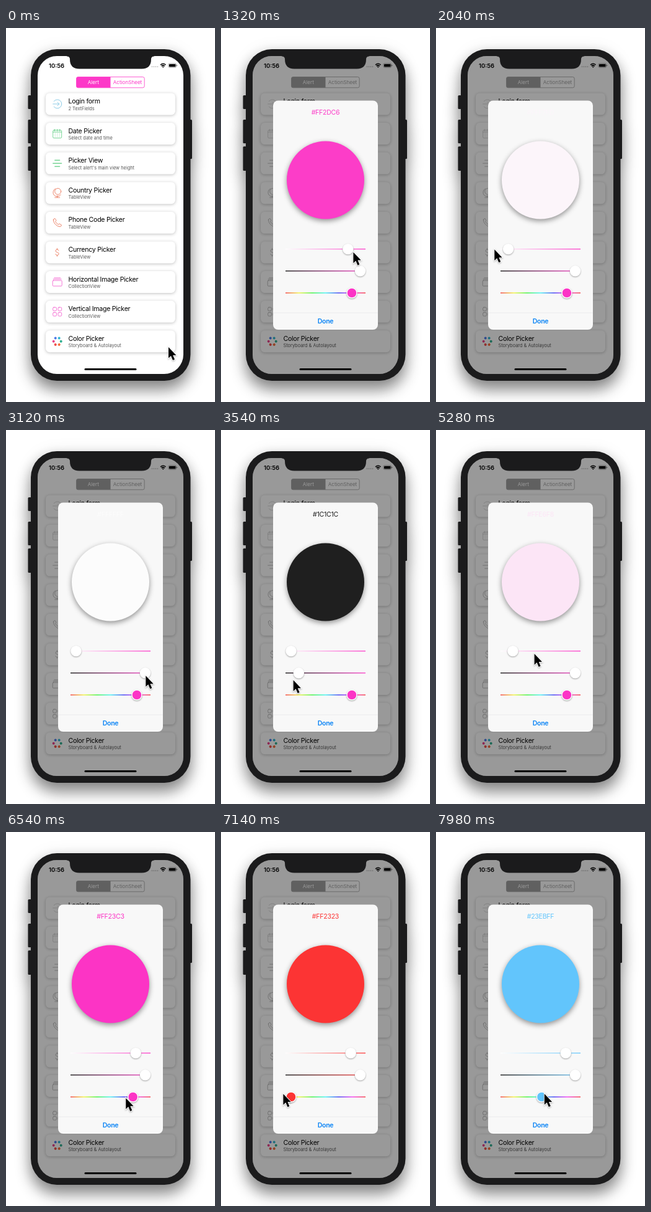
Recreate the animation shown at these times as an HTML page. Size 337 by 600 pixels, loop 8 s.

```html
<!DOCTYPE html>
<html lang="en">
<head>
<meta charset="utf-8">
<title>Color picker alert</title>
<style>
  html, body { margin: 0; width: 100%; height: 100%; overflow: hidden; background: #fff; }
  svg { display: block; width: 100vw; height: 100vh; }
  text { font-family: Inter, "Noto Sans", sans-serif; }
  .mid { text-anchor: middle; }
  .title { font-size: 10.6px; letter-spacing: -.28px; }
  .sub { font-size: 7.4px; fill: #5a5a5a; }
  .seg { font-size: 8.1px; }
  .icon { fill: none; stroke-width: .8; stroke-linecap: round; stroke-linejoin: round; }
  .card { fill: #fff; filter: drop-shadow(0 1.5px 2.5px rgba(0,0,0,.25)); }
  .knob { fill: #fff; filter: drop-shadow(0 1px 1.3px rgba(0,0,0,.35)); }
  #body { filter: drop-shadow(0 14px 12px rgba(0,0,0,.46)) drop-shadow(0 0 11px rgba(0,0,0,.08)); }
  #disc { filter: drop-shadow(0 3px 4.5px rgba(0,0,0,.42)); }
  #cursor { filter: drop-shadow(0 1px 1px rgba(0,0,0,.3)); }
</style>
</head>
<body>
<svg viewBox="0 0 337 600">
  <defs>
    <clipPath id="screen"><rect x="51" y="45" width="235" height="510" rx="31"/></clipPath>
    <linearGradient id="satGrad"><stop stop-color="#fff"/><stop offset="1" class="tint"/></linearGradient>
    <linearGradient id="briGrad"><stop stop-color="#000"/><stop offset="1" class="tint"/></linearGradient>
    <linearGradient id="hueGrad"></linearGradient>
  </defs>

  <g id="body" fill="#1b1b1c">
    <rect x="35.5" y="108" width="8" height="22" rx="1.5"/>
    <rect x="35.5" y="147" width="8" height="38" rx="1.5"/>
    <rect x="35.5" y="190" width="8" height="39" rx="1.5"/>
    <rect x="292" y="147" width="8" height="63" rx="1.5"/>
    <rect x="40" y="34" width="257.5" height="532" rx="42"/>
  </g>

  <g clip-path="url(#screen)">
    <rect x="51" y="45" width="235" height="510" fill="#fff"/>
    <text x="81.5" y="63.5" class="mid" font-size="9.5" font-weight="600">10:56</text>
    <path d="M235.5 62H245" stroke="#aaa" stroke-width="1.7" stroke-linecap="round" stroke-dasharray="0 3"/>
    <g fill="none" stroke="#000" stroke-width="1.5">
      <path d="M249 59.2Q253.3 55.2 257.6 59.2M250.7 61.1Q253.3 58.7 255.9 61.1"/>
      <path d="M253.3 63.3L252.3 62.2H254.3Z" stroke-width="1"/>
      <rect x="262" y="57" width="12.5" height="6.2" rx="1.7" stroke-width=".7" stroke="#777"/>
      <path d="M275.7 59V61.2" stroke-width=".9" stroke="#777"/>
    </g>
    <rect x="263" y="58" width="10.5" height="4.2" rx=".9"/>

    <g class="tinted">
      <rect x="113.5" y="78.5" width="109.7" height="17.3" rx="2.7" fill="#fff" stroke="#fd38c8" stroke-width=".8"/>
      <path d="M168.5 78.5H116.2Q113.5 78.5 113.5 81.2V93.1Q113.5 95.8 116.2 95.8H168.5Z" fill="#fd38c8"/>
      <text x="140.8" y="90" class="seg mid" fill="#fff">Alert</text>
      <text x="196" y="90" class="seg mid" fill="#fd38c8">ActionSheet</text>
    </g>
    <g id="cards"></g>
    <rect x="126.5" y="546" width="84" height="3" rx="1.5"/>
    <rect id="dim" x="51" y="45" width="235" height="510"/>
    <path fill="#1b1b1c" d="M98 44H239V45.5Q234 45.5 234 50Q234 65.5 219 65.5H118Q103 65.5 103 50Q103 45.5 98 45.5Z"/>
  </g>

  <g id="alert">
    <rect x="84" y="116.5" width="169" height="367.5" rx="8" fill="#f8f8f8"/>
    <text id="hex" x="168.5" y="139" class="title mid"></text>
    <circle id="disc" cx="168.5" cy="244" r="62.5"/>
    <g id="tracks"></g>
    <circle id="satKnob" class="knob" cy="354.6" r="8.7"/>
    <circle id="briKnob" class="knob" cy="389.8" r="8.7"/>
    <g id="hueKnob" class="knob"><circle cy="425" r="8.7"/><circle id="hueDot" cy="425" r="7.3"/></g>
    <path d="M84 457H253" stroke="#e4e4e6" stroke-width=".7"/>
    <text x="168.5" y="474" class="title mid" font-weight="600" fill="#0a84f5">Done</text>
  </g>

  <path id="cursor" d="M0 0V17.6L4 13.9L7 21L10 19.7L7.1 12.9H12.4Z" stroke="#fff" stroke-width="1.8" paint-order="stroke"/>
</svg>

<script>
const LOOP = 8000, STEP = 60;
const $ = id => document.getElementById(id);

// Icons are drawn around the point (0,0).
const square = (x, y) => `<rect x="${x}" y="${y}" width="5.7" height="5.7" rx="1.5"/>`;
const gridDots = [-.5, 2, 4.5].map(y => `M-3.5 ${y}h.1m3.4 0h.1m3.4 0h.1`).join('');
const ring = ['#2fae8f', '#f2703c', '#f0504a', '#e8408a', '#4a78e8', '#30b8d0'].map((color, i) =>
  `<circle cx="6" r="2" fill="${color}" transform="rotate(${i * 60})"/>`).join('');

const rows = [
  ['Login form', '2 TextFields', '#72bfe0', '<path d="M-5.5 -4.3A7 7 0 1 1 -5.5 4.3M-7 0H3M0 -3L3 0L0 3"/>'],
  ['Date Picker', 'Select date and time', '#5ccc80',
    `<rect x="-7" y="-5.5" width="14" height="12.5" rx="1.5"/><path d="M-7 -2.5H7M-4 -7V-4M0 -7V-4M4 -7V-4${gridDots}"/>`],
  ['Picker View', "Select alert's main view height", '#5ccc80', '<path d="M-4 -5H4M-7 0H7M-4 5H4" stroke-width="1.2"/>'],
  ['Country Picker', 'TableView', '#e8694a',
    '<circle cx="1" cy="-2.5" r="5"/><path d="M-3 -7A6.7 6.7 0 1 0 5.5 2.7M0 4.2V7M-4 7.3H4"/>'],
  ['Phone Code Picker', 'TableView', '#e8694a',
    '<path d="M-6.3 -4.5Q-5.5 -7 -3.8 -6.7L-1.7 -3.6L-3 -1.7Q-1.5 1.5 1.7 3L3.6 1.7L6.7 3.8Q7 5.5 4.5 6.5Q.5 6.5 -3.3 2.5Q-6.5 -1 -6.3 -4.5Z"/>'],
  ['Currency Picker', 'TableView', '#e8694a',
    '<path d="M2.3 -3Q1.5 -4.6 -.3 -4.6Q-2.7 -4.4 -2.7 -2.3Q-2.7 -.6 -.3 0Q2.5 .7 2.5 2.5Q2.3 4.6 -.3 4.6Q-2.3 4.5 -2.9 2.8M-.3 -6.5V-4.6M-.3 4.6V6.5"/>'],
  ['Horizontal Image Picker', 'CollectionView', '#f254cc',
    '<rect x="-7.5" y="-2.5" width="15" height="9" rx="1.3"/><path d="M-6.5 -4.6H6.5M-5 -6.7H5"/>'],
  ['Vertical Image Picker', 'CollectionView', '#f254cc',
    square(-7, -7) + square(1.3, -7) + square(-7, 1.3) + square(1.3, 1.3)],
  ['Color Picker', 'Storyboard &amp; Autolayout', 'none', ring],
];

$('cards').innerHTML = rows.map(([title, sub, color, icon], i) => `
  <g transform="translate(0 ${104.4 + 47.6 * i})">
    <rect class="card" x="64" width="209" height="35" rx="6.5"/>
    <g class="icon ${color === 'none' ? '' : 'tinted'}" stroke="${color}" transform="translate(82.7 17.5)">${icon}</g>
    <text class="title" x="100.5" y="16.5">${title}</text>
    <text class="sub" x="100.5" y="27.2">${sub}</text>
  </g>`).join('');

$('hueGrad').innerHTML = [0, 1, 2, 3, 4, 5, 6].map(i =>
  `<stop offset="${i / 6}" stop-color="hsl(${i * 60} 90% 55%)"/>`).join('');

$('tracks').innerHTML = ['sat', 'bri', 'hue'].map((name, i) =>
  `<rect x="104" y="${354 + 35.2 * i}" width="129" height="1.25" fill="url(#${name}Grad)"/>`).join('');

const clamp = (v, lo = 0, hi = 1) => Math.min(hi, Math.max(lo, v));
const ease = k => { k = clamp(k); return k * k * (3 - 2 * k); };

// Cursor moves: start, end, x, y.
const moves = [
  [760, 1350, 213, 358.5], [1380, 1560, 209.2, 357],
  [1740, 2140, 73, 355], [2160, 2700, 229, 394],
  [3060, 3640, 107, 402], [3780, 4320, 238, 394],
  [4380, 5040, 115, 356], [5160, 5420, 213.6, 363],
  [5820, 6300, 215.4, 430], [6420, 6780, 130, 418],
  [6780, 7320, 90, 421], [7320, 7860, 174.8, 420]];

function cursorAt(t) {
  let x = 262, y = 512;
  for (const [start, end, toX, toY] of moves) {
    const k = ease((t - start) / (end - start));
    x += (toX - x) * k;
    y += (toY - y) * k;
  }
  return [x, y];
}

// A dragged knob follows the cursor one step late and keeps its place after release.
const KNOB_MIN = 113, KNOB_RANGE = 111.5, GRAB = 4.4;
const knobX = value => KNOB_MIN + KNOB_RANGE * value;
function dragged(t, initial, drags) {
  const drag = drags.filter(([start]) => t >= start).pop();
  if (!drag) return initial;
  const [x] = cursorAt(Math.min(t, drag[1]) - STEP);
  return clamp((x - GRAB - KNOB_MIN) / KNOB_RANGE);
}
const satAt = t => dragged(t, .8235, [[1800, 2160], [5160, 5640]]);
const briAt = t => dragged(t, 1, [[3060, 4380]]);
const hueAt = t => dragged(t, .8786, [[6420, LOOP]]);

function hsv(h, s, v) {
  return [5, 3, 1].map(n => {
    const k = (n + h * 6) % 6;
    return Math.round(255 * (v - v * s * clamp(Math.min(k, 4 - k))));
  });
}

// Screen rendering softens colours, most of all around cyan.
function shown(h, s, v) {
  const cyan = Math.exp(-(((h * 360 - 185) / 45) ** 2));
  return `rgb(${hsv(h + cyan * 16 / 360, s * (.92 - .21 * cyan), v * .972 + .016)})`;
}

const toHex = rgb => '#' + rgb.map(c => c.toString(16).padStart(2, '0')).join('').toUpperCase();
const tints = document.querySelectorAll('.tint');
const tinted = document.querySelectorAll('.tinted');

function draw(t) {
  const [x, y] = cursorAt(t);
  const sat = satAt(t), bri = briAt(t), hue = hueAt(t - STEP);
  const open = ease((t - 600) / 480);
  const color = shown(hue, sat, bri), pure = shown(hue, .8627, 1);

  $('cursor').setAttribute('transform', `translate(${x} ${y})`);
  $('dim').setAttribute('opacity', .4 * open);
  tinted.forEach(el => {
    el.style.filter = open ? `grayscale(${open})` : 'none';
    el.style.opacity = 1 - .35 * open;
  });

  $('alert').setAttribute('opacity', open);
  $('alert').setAttribute('transform', `translate(168.5 300) scale(${1.15 - .15 * open}) translate(-168.5 -300)`);

  $('hex').textContent = toHex(hsv(hue, sat, bri));
  $('hex').setAttribute('fill', color);
  $('disc').setAttribute('fill', color);
  $('hueDot').setAttribute('fill', pure);
  tints.forEach(stop => stop.setAttribute('stop-color', pure));
  $('satKnob').setAttribute('cx', knobX(sat));
  $('briKnob').setAttribute('cx', knobX(bri));
  $('hueKnob').setAttribute('transform', `translate(${knobX(hueAt(t))} 0)`);
}

function tick() {
  const t = performance.now() % LOOP;
  draw(Math.floor(t / STEP) * STEP);
  requestAnimationFrame(tick);
}
tick();
</script>
</body>
</html>
```
